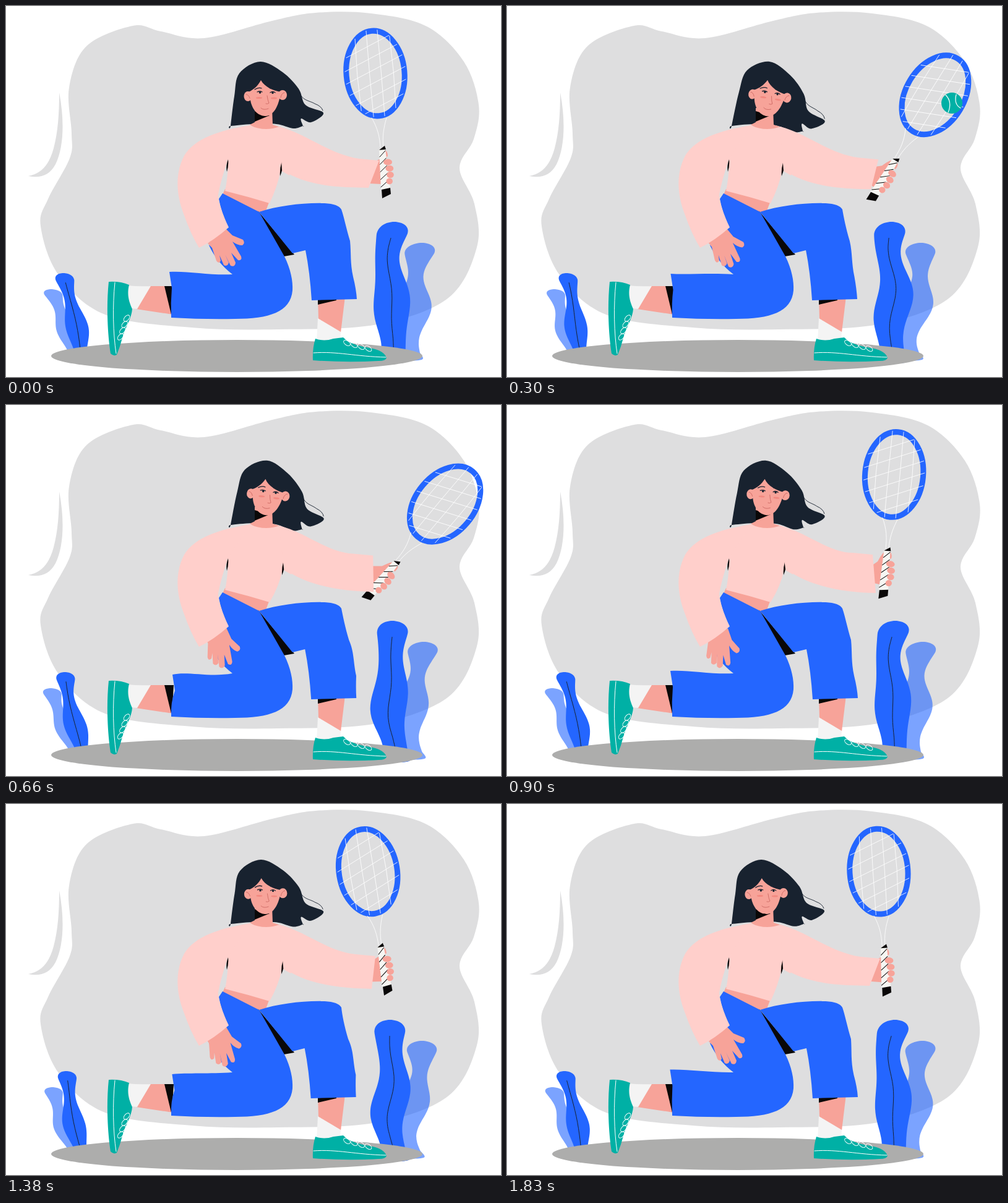
An HTML page for the animation above (1.86 s loop, 800 px wide and 600 px high).

```html
<!DOCTYPE html>
<html lang="en">
<head>
<meta charset="utf-8">
<title>Tennis player</title>
<style>
html, body { margin: 0; width: 100%; height: 100%; overflow: hidden; background: #fff; }
svg { display: block; width: 800px; height: 600px; }
.grey { fill: #dededf; }
.blue { fill: #2466ff; }
.pale { fill: #2466ff; fill-opacity: .6; }
.skin { fill: #f7a399; }
.shirt { fill: #ffcfcb; }
.teal { fill: #00b0a5; }
.sock { fill: #f4f4f4; }
.hair { fill: #18222f; }
.ink { fill: #0a0808; }
.line { fill: none; stroke-linecap: round; stroke-linejoin: round; }
.white { stroke: #fff; }
.dark { stroke: #18222f; }
.fold { stroke: #c9645f; }
</style>
</head>
<body>
<svg viewBox="0 0 800 600">
  <path id="blob" class="grey"/>
  <path class="grey" d="M86 140C95 187 93 230 80 256C70 274 56 279 36 275C58 271 70 256 77 230C84 204 86 174 86 140Z"/>
  <g id="plants"></g>
  <ellipse cx="373" cy="566" rx="300" ry="26" fill="#adadac"/>

  <!-- back foot -->
  <path class="skin" d="M230 453H262L270 499L210 490Z"/>
  <path class="ink" d="M256 453H271L268 503Z"/>
  <path class="sock" d="M196 452Q214 454 234 453L212 490L202 489Q195 472 196 452Z"/>
  <path class="teal" d="M166 446Q185 445 199 451C195 467 199 479 204 490C203 505 193 519 188 537Q184 552 179 564Q174 567 169 562C164 530 162 485 166 446Z"/>
  <path class="line white" d="M176 447C172 485 173 530 178 562"/>
  <g id="backLaces" class="line white"></g>

  <!-- front foot -->
  <path class="skin" d="M504 470H548L541 528L505 507Z"/>
  <path class="ink" d="M504 472H534V476L504 483Z"/>
  <path class="sock" d="M504 505L541 527L540 543H502Z"/>
  <path class="teal" d="M500 538Q514 543 529 538L545 536C554 545 568 550 588 553C605 556 613 562 615 569Q614 574 602 574Q550 577 496 573Q495 554 500 538Z"/>
  <path class="line white" d="M497 561C535 558 565 567 614 568"/>
  <g id="frontLaces" class="line white"></g>

  <!-- head -->
  <path id="hair" class="hair"/>
  <path class="skin" d="M394 192L402 188V165H430L431 192L444 196Q420 210 394 192Z"/>
  <path class="ink" d="M402 170L426 177L402 187Z"/>
  <g id="head">
    <path class="line dark" stroke-width=".9" d="M472 134C477 154 489 152 499 158Q510 162 512 169"/>
    <ellipse class="skin" cx="391" cy="146" rx="6.5" ry="8"/>
    <ellipse class="skin" cx="447" cy="144" rx="7" ry="8"/>
    <path class="skin" d="M412 120C407 129 401 135 392 139L396 157C401 173 411 178 420 178C432 177 441 163 444 139C432 137 418 131 412 120Z"/>
    <path class="line fold" stroke-width=".8" d="M388 143Q392 143 394 149M450 140Q445 141 444 148M422 145Q423 153 425 157Q423 159 420 158M412 165Q416 169 424 166"/>
    <g fill="#f28980"><ellipse cx="409" cy="148.500" rx="5" ry="1.500"/><ellipse cx="433" cy="149" rx="5" ry="1.500"/></g>
    <path class="line dark" stroke-width="1.300" d="M402 135Q408 131 413 133M427 133Q434 133 438 136M406 139Q410 137 414 139M427 140Q431 137 435 140"/>
    <circle class="hair" cx="410.500" cy="140" r="1.700"/><circle class="hair" cx="431" cy="140.500" r="1.700"/>
  </g>

  <!-- body -->
  <path class="skin" d="M354 296L426 315L420 331L408 334L350 305Z"/>
  <path class="ink" d="M407 331L466 402L449 405Z"/>
  <path id="frontLeg" class="blue"/>
  <path id="backLeg" class="blue"/>
  <path id="restHand" class="skin" d="M352 357L366 371L383 378Q387 383 382 387Q374 387 366 381L380 405Q382 412 375 411L364 399L371 415Q370 423 363 420L354 402L360 415Q358 422 352 419L345 403L347 412Q344 418 340 412L333 391L326 384Z"/>
  <path id="top" class="shirt"/>
  <path class="shirt" d="M394 193C345 201 305 214 288 242C272 272 276 308 287 336Q298 368 312 391Q335 380 360 358C350 337 343 316 343 305Q348 278 359 248Z"/>
  <path class="ink" d="M359 248Q360 259 357 268Q355 258 359 248Z"/>
  <path id="armpit" class="ink"/>

  <!-- racket arm -->
  <g id="swing">
    <path id="palm" class="skin"/>
    <g transform="translate(597 109) rotate(-5)">
      <ellipse rx="47" ry="69" fill="none" stroke="#2466ff" stroke-width="9"/>
      <path id="strings" class="line white" stroke-width=".8"/>
    </g>
    <path class="line white" stroke-width=".8" d="M591 181C601 198 604 212 605 229M615 181C610 198 608 212 610 229"/>
    <path class="skin" d="M611 233Q617 233 617 243L612 246Z"/>
    <path fill="#f6f6f2" d="M603 232L613 231L621 295L606 297Z"/>
    <path class="ink" d="M603 233L612 226L614 232Z"/>
    <path class="ink" d="M607 297L621 294L622 304L608 311Z"/>
    <path id="grip" class="line" stroke="#0a0808"/>
    <g id="fingers" class="skin"></g>
  </g>
  <path id="sleeve" class="shirt"/>

  <g id="ball">
    <circle class="teal" r="17"/>
    <path class="line white" stroke-width="1.200" d="M-10 -13Q1 -2 -6 15M7 -14Q3 2 14 8"/>
  </g>
</svg>
<script>
const LOOP = 1860, SLOT = 30, FRAMES = 52, PLANT_FRAMES = 25;
const RAD = Math.PI / 180, TAU = Math.PI * 2;
const { sin, cos, min, max, abs, floor, sqrt } = Math;
const el = id => document.getElementById(id);
const draw = (id, d) => el(id).setAttribute('d', d);
const move = (id, t) => el(id).setAttribute('transform', t);
const parse = s => s.split(' ').map(p => p.split(',').map(Number));
const clamp = v => max(0, min(1, v));
const ease = u => (1 - cos(Math.PI * clamp(u))) / 2;
const repeat = (n, f) => Array.from({ length: n }, (_, i) => f(i));

// smooth path through points; a doubled point makes a corner
function spline(pts, closed) {
  const n = pts.length;
  const at = i => closed ? pts[(i + n) % n] : pts[max(0, min(n - 1, i))];
  const pair = (a, b) => a.toFixed(2) + ' ' + b.toFixed(2);
  let d = 'M' + pair(...pts[0]);
  for (let i = 0; i < (closed ? n : n - 1); i++) {
    const [p, a, b, q] = [at(i - 1), at(i), at(i + 1), at(i + 2)];
    d += 'C' + pair(a[0] + (b[0] - p[0]) / 6, a[1] + (b[1] - p[1]) / 6) +
      ' ' + pair(b[0] - (q[0] - a[0]) / 6, b[1] - (q[1] - a[1]) / 6) + ' ' + pair(...b);
  }
  return d + (closed ? 'Z' : '');
}

// looping cubic track of [frame, value] keys
function track(keys, n) {
  const m = keys.length;
  const key = i => {
    const [f, v] = keys[(i + m) % m];
    return [f + floor(i / m) * FRAMES, v];
  };
  let i = m - 1;
  while (keys[i][0] > n) i--;
  const [p, a, b, q] = [key(i - 1), key(i), key(i + 1), key(i + 2)];
  const h = b[0] - a[0], u = (n - a[0]) / h, u2 = u * u, u3 = u2 * u;
  const ta = h * (b[1] - p[1]) / (b[0] - p[0]), tb = h * (q[1] - a[1]) / (q[0] - a[0]);
  return a[1] * (2 * u3 - 3 * u2 + 1) + ta * (u3 - 2 * u2 + u) + b[1] * (3 * u2 - 2 * u3) + tb * (u3 - u2);
}

function turn([x, y], [cx, cy], deg) {
  const c = cos(deg * RAD), s = sin(deg * RAD);
  return [cx + (x - cx) * c - (y - cy) * s, cy + (x - cx) * s + (y - cy) * c];
}

const SWING = [[0, 0], [3, 5], [8, 36.5], [16, 48], [18, 45], [25, 10.3], [33, -9], [43, 3], [51, 1.4]];
const TILT = [[0, 0], [8, 8], [18, 6.5], [25, 4], [33, 1.5]];
const NECK = [418, 185];
const HAIR = parse('411,90 377,109 369,146 363,194 363,194 398,191 437,191 464,198 480,194 480,194 477,182 493,188 513,173 484,160 473,134 447,107');

draw('blob', spline(parse('205,32 130,65 102,132 106,205 103,246 68,312 56,356 85,435 160,499 300,520 440,523 600,515 715,472 761,390 757,320 733,262 756,215 764,160 740,90 680,33 590,12 500,11 430,24 320,52 250,41'), true));

// leaf: width swells around `peak`, with waists half a `span` away
const SOIL = 552;
const LEAVES = [
  { kind: 'pale', x: 74, top: 458, lean: 33, width: 18, peak: .73, slim: .25, span: .8, curl: 0 },
  { kind: 'blue', x: 95, top: 432, lean: 24, width: 18.5, peak: .73, slim: .25, span: .8, curl: 0 },
  { kind: 'pale', x: 672, top: 383, lean: -21, width: 27, peak: .61, slim: .27, span: .6, curl: 0 },
  { kind: 'blue', x: 621, top: 349, lean: 2, width: 29.5, peak: .65, slim: .17, span: .72, curl: 3 }
];
function addPath(cls) {
  const path = document.createElementNS('http://www.w3.org/2000/svg', 'path');
  path.setAttribute('class', cls);
  el('plants').append(path);
  return path;
}
for (const leaf of LEAVES) {
  leaf.body = addPath(leaf.kind);
  if (leaf.kind === 'blue') leaf.stem = addPath('line dark');
}

function drawLeaf(leaf, wave) {
  const spine = u => {
    const y = leaf.top + u * (SOIL - leaf.top);
    const sway = leaf.width / 8 * sin(wave + (150 + 2.05 * (y - 370)) * RAD);
    return [leaf.x + leaf.lean * u + leaf.curl * cos(TAU * (y - 455) / 110) + sway, y];
  };
  const half = u => {
    const cap = sqrt(1 - (1 - min(1, u / .11)) ** 2);
    return leaf.width * cap * (1 - leaf.slim + leaf.slim * cos(TAU * (u - leaf.peak) / leaf.span));
  };
  const left = [], right = [];
  for (let i = 0; i <= 24; i++) {
    const u = 1.12 * (i / 24) ** 1.6, [x, y] = spine(u), w = half(u);
    right.push([x + w, y]);
    if (i) left.unshift([x - w, y]);
  }
  leaf.body.setAttribute('d', spline([...right, ...left], true));
  leaf.stem?.setAttribute('d', spline(repeat(12, i => spine(.13 + i * .08)), false));
}

// laces, strings, grip bands and fingers
const laces = (id, x, y, dx, dy, tilt) => {
  el(id).innerHTML = repeat(4, i =>
    `<ellipse rx="6" ry="3.500" transform="translate(${x + i * dx} ${y + i * dy}) rotate(${tilt})"/>`).join('');
};
laces('backLaces', 195, 505, -3.3, 10, -50);
laces('frontLaces', 551, 545, 11.5, 3, 35);

let strings = '';
for (const x of [-28, -9, 9, 28]) {
  const y = 71 * sqrt(1 - (x / 49) ** 2);
  strings += `M${x} ${-y}Q${x * 1.1} 0 ${x} ${y}`;
}
for (let y = -48; y <= 58; y += 20.5) {
  const slope = .42, a = 1 / 49 ** 2 + slope ** 2 / 71 ** 2, b = -2 * y * slope / 71 ** 2;
  const root = sqrt(b * b - 4 * a * (y * y / 71 ** 2 - 1));
  const end = s => { const x = (-b + s * root) / (2 * a); return `${x} ${y - slope * x}`; };
  strings += `M${end(-1)}L${end(1)}`;
}
draw('strings', strings);
draw('grip', repeat(5, i => `M${604 + i * .5} ${244 + i * 12.2}L${613 + i * 1.3} ${234 + i * 12}`).join(''));
el('fingers').innerHTML = repeat(4, i =>
  `<ellipse cx="${617 + 4 * sin(i * .8)}" cy="${252.5 + i * 10.3}" rx="${7 - i * .6}" ry="5"/>`).join('');

function drawLegs(wave) {
  const c = cos(wave) - 1, s = sin(wave);
  const dx = -2.03 * c - 2.64 * s, knee = 1.5 * c, hem = .67 * c;
  draw('frontLeg', `M409 333C440 323 480 318 515 319Q537 320 542 329C${546 + knee} 340 ${550 + knee} 360 ${556 + knee} 380C${558 + dx} 400 ${556 + dx} 415 ${561 + dx} 438Q${566 + hem} 458 ${567 + hem} 474L${494 + hem} 476Q${491 + hem} 430 ${484 + hem} 395L463 400Z`);
  const x = 264 + dx, y = 430 - 3.4 * c - 2 * s;
  draw('backLeg', `M344 312L350 303L409 333L450 405C460 425 464 445 463 460C460 495 425 506 370 506Q320 507 267 504Q266 480 ${x + 4} ${y + 26}L${x} ${y}C292 ${y - 2 + 4 * s} 330 ${436 - 5 * s} 366 434Q341 415 328 387L359 357Q348 335 344 312Z`);
}

function drawHead(n) {
  const tilt = track(TILT, n);
  move('head', `rotate(${tilt} ${NECK})`);
  draw('hair', spline(HAIR.map(p => {
    const loose = p[0] < 400 ? clamp((190 - p[1]) / 45) : 1;
    return turn(p, NECK, tilt * loose);
  }), true));
}

function drawArms(n) {
  const sway = (1 - cos(TAU * n / FRAMES)) / 2, side = 444 + 4 * sway;
  move('restHand', `rotate(${26 * sway} 345 370)`);
  draw('top', `M394 193Q418 204 442 195L480 210L${side + 14} 274L${side} 266Q${side - 6} 294 426 319Q390 308 354 299Q359 275 359 248L345 215Z`);
  draw('armpit', `M${side + 2} 251Q${side + 5} 261 ${side - 1} 275Q${side - 2} 262 ${side + 2} 251Z`);

  const swing = track(SWING, n), thumb = clamp((swing - 3) / 7);
  move('swing', `translate(${-.03 * swing} ${.05 * swing}) rotate(${swing} 595 271)`);
  draw('palm', `M606 ${247 - 14 * thumb}Q${602 - thumb} ${248 - 12 * thumb} 596 252L584 264L586 287L606 288Z`);

  // the cuff opens slowly with the stroke and closes faster
  const open = n < 33 ? ease(n / 25) : ease((43 - n) / 10);
  const tx = 603 - 12 * open, ty = 250 - 8 * open, bx = 586 + 10 * open, by = 294 + 10 * open;
  draw('sleeve', `M441 195C485 206 520 239 ${tx - 32} ${ty - 3}L${tx} ${ty}L${bx} ${by}C545 ${by - 1} 490 294 ${side + 2} 265Z`);
}

function drawBall(n) {
  const gap = n - 8, far = abs(gap), back = gap > 0;
  el('ball').style.display = far < 5 ? '' : 'none';
  move('ball', `translate(${719 + far * 25} ${157 - far * (back ? 9 : 6)}) rotate(${gap * 20})`);
}

function render(n) {
  const wave = TAU * n / PLANT_FRAMES;
  LEAVES.forEach(leaf => drawLeaf(leaf, wave));
  drawLegs(wave);
  drawHead(n);
  drawArms(n);
  drawBall(n);
}

// every sixth slot repeats the pose before it
let last = -1;
function tick() {
  const slot = floor(performance.now() % LOOP / SLOT);
  const n = slot - min(10, floor((slot + 5) / 6));
  if (n !== last) render(last = n);
  requestAnimationFrame(tick);
}
tick();
</script>
</body>
</html>
```
